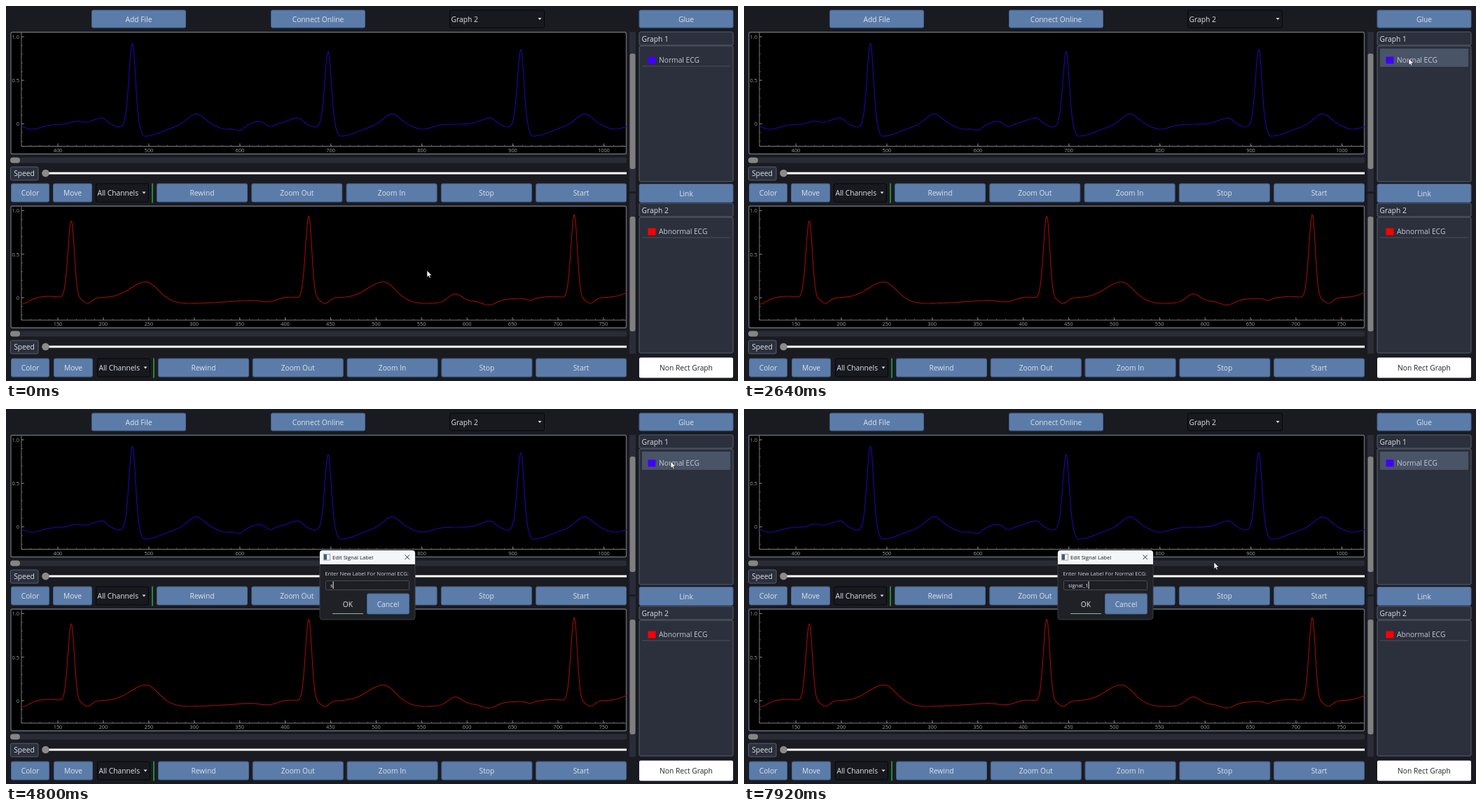
Animation, 1045 px wide and 536 px high, one loop 8000 ms. Source, as an HTML page:

```html
<!DOCTYPE html>
<html lang="en">
<head>
<meta charset="utf-8">
<title>Signal viewer</title>
<style>
html, body { margin: 0; width: 100%; height: 100%; overflow: hidden; background: #1a1b21; }
svg { display: block; width: 1045px; height: 536px; font-family: "Open Sans", "Noto Sans", sans-serif; fill: #dde2ea; }
text { white-space: pre; }
</style>
</head>
<body>
<svg id="stage" viewBox="0 0 1045 536"></svg>
<script>
const NS = 'http://www.w3.org/2000/svg';
const stage = document.getElementById('stage');
const SMALL = { 'font-size': 7.7 }, AXIS = { 'font-size': 7.4, fill: '#a0a0a0' };
let layer = stage;

function add(tag, attrs, content) {
  const el = document.createElementNS(NS, tag);
  for (const key in attrs) el.setAttribute(key, attrs[key]);
  if (content !== undefined) el.textContent = content;
  return layer.appendChild(el);
}
function group(draw) {
  const parent = layer;
  const g = layer = add('g', {});
  draw();
  layer = parent;
  return g;
}
const rect = (l, t, r, b, fill, more) =>
  add('rect', { x: l, y: t, width: r - l, height: b - t, fill, ...more });
const line = (x1, y1, x2, y2, stroke, width = 1) =>
  add('path', { d: `M${x1} ${y1}L${x2} ${y2}`, stroke, 'stroke-width': width, fill: 'none' });
function label(x, mid, str, more) {
  const style = { 'font-size': 10.25, ...more };
  return add('text', { x, y: mid + style['font-size'] * .355, ...style }, str);
}
const centred = (x, mid, str, more) => label(x, mid, str, { 'text-anchor': 'middle', ...more });

function button(l, t, r, b, str) {
  rect(l + .5, t + .5, r - .5, b - .5, '#5b7ca9', { rx: 2, stroke: '#45618a' });
  centred((l + r) / 2, (t + b) / 2 + .5, str);
}
function panel(l, t, r, b) {
  rect(l + .5, t + .5, r - .5, b - .5, '#2b303c', { rx: 2, stroke: '#565e6e' });
}
function combo(l, t, r, b, str) {
  rect(l + .5, t + .5, r - .5, b - .5, '#18191e', { rx: 2, stroke: '#060608' });
  label(l + 2.5, (t + b) / 2 + .7, str);
  const x = r - 7, y = (t + b) / 2 - 1.5;
  add('path', { d: `M${x - 2.5} ${y}h5l-2.5 3z`, fill: '#dde2ea' });
}

// Bell with its own width on each side of the centre.
function bell(dx, height, left, right = left) {
  const u = dx / (dx < 0 ? left : right);
  return height * Math.exp(-u * u / 2);
}
// Each beat is a spike plus the same small waves, placed relative to it.
function trace({ base, beats, waves, ripples, stroke }) {
  let d = '';
  for (let x = 22; x <= 886; x++) {
    let y = base;
    for (const [r, height] of beats) {
      y -= bell(x - r, height, 4.8, 4.2);
      for (const [offset, ...shape] of waves) y -= bell(x - r - offset, ...shape);
    }
    for (const [at, ...shape] of ripples) y -= bell(x - at, ...shape);
    d += (d ? 'L' : 'M') + x + ' ' + y.toFixed(2);
  }
  add('path', { d, stroke, fill: 'none', 'stroke-width': 1.1, 'stroke-linejoin': 'round' });
}

function plot(top, first, step, gap) {
  rect(7, top + .5, 885.5, top + 174.5, '#000', { rx: 2, stroke: '#686c75', 'stroke-width': 1.3 });
  const base = top + 163.5, axis = '#7d7d7d', minor = '#4a4a4a';
  for (let x = 22.5; x < 885; x += 13) line(x, base, x, base - 2, minor);
  for (let y = top + 7; y < base; y += 12.45) line(22, y, 24, y, minor);
  line(22, top + 1, 22, base, axis);
  line(22, base, 885, base, axis);
  for (let x = 74, n = first; x < 886; x += gap, n += step) {
    line(x, base, x, base - 4, axis);
    centred(x, top + 169.3, n, AXIS);
  }
  ['1.0', '0.5', '0'].forEach((s, i) => {
    const y = top + 7 + i * 62.2;
    line(22, y, 26, y, axis);
    label(19, y + .2, s, { ...AXIS, 'text-anchor': 'end' });
  });
}

function controls(top, speedTop, shift) {
  rect(7, speedTop - 13, 886, speedTop - 5, '#292b35', { rx: 2 });
  rect(6, speedTop - 13, 20, speedTop - 5, '#858585', { rx: 4 });
  panel(6, speedTop, 46.5, speedTop + 20);
  centred(26, speedTop + 10, 'Speed');
  line(56, speedTop + 9.5, 886, speedTop + 9.5, '#fff', 3);
  add('circle', { cx: 56.5, cy: speedTop + 9.5, r: 5.3, fill: '#8b8b8b' });

  const bottom = top + 27;
  button(7, top, 62, bottom, 'Color');
  button(67 + shift / 2, top, 123 + shift / 2, bottom, 'Move');
  combo(128 + shift, top, 204 + shift, bottom, 'All Channels');
  line(209 + shift, top, 209 + shift, bottom + 1, '#1f8a3a', 2);
  ['Rewind', 'Zoom Out', 'Zoom In', 'Stop', 'Start'].forEach((s, i) => {
    const l = 215 + shift + i * (135.3 - shift / 4);
    button(l, top, Math.min(l + 130, 886), bottom, s);
  });
}

function sidebar(top, title, name, color) {
  panel(903.5, top, 1038.5, top + 20);
  label(907.5, top + 10.5, title);
  panel(903.5, top + 20, 1038.5, top + 215);
  const mark = rect(908, top + 24.5, 1034, top + 50.5, '#4a5467', { visibility: 'hidden' });
  line(908, top + 49.5, 1034, top + 49.5, '#4b515d');
  rect(916.5, top + 36, 927.5, top + 46, color);
  label(932, top + 41, name, { fill: '#c3c8d1' });
  return mark;
}

rect(0, 0, 1045, 536, '#1a1b21');
button(122, 5.5, 257, 31.5, 'Add File');
button(378, 5.5, 513, 31.5, 'Connect Online');
combo(633, 5.5, 769, 31.5, 'Graph 2');
button(903.5, 5.5, 1038.5, 31.5, 'Glue');

plot(37, 400, 100, 129.9);
trace({
  base: 169,
  beats: [[-97, 110], [180.5, 116], [460, 104], [735, 107]],
  waves: [[-43, 9, 14, 6], [-19, -4, 6], [17, -17, 5, 26], [91, 15, 12, 11], [134, -7, 12, 14]],
  ripples: [[100, 4, 8], [334, -6, 6], [361, 4, 8], [377, -4, 5]],
  stroke: '#2305a4'
});

plot(285.5, 150, 50, 64.9);
trace({
  base: 417,
  beats: [[93.3, 110], [432.3, 117], [811.3, 119]],
  waves: [[-32, 2, 12], [23, -8, 6], [107, 23, 22, 16], [165, -8, 25, 70]],
  ripples: [[22, -9, 10], [375, -4, 12], [641, 12, 10], [690, -7, 10], [748, -3, 5]],
  stroke: '#a00a0a'
});

controls(253.5, 229.5, 0);
controls(503.5, 477.5, 2);

for (const [t, b, from, to] of [[37, 265, 68, 233], [268, 497, 301, 465]]) {
  rect(890, t, 899, b, '#2a2c37');
  rect(890.5, from, 898.5, to, '#7f7f80', { rx: 3 });
}

const mark = sidebar(36.5, 'Graph 1', 'Normal ECG', '#4000ff');
button(903.5, 254, 1038.5, 281, 'Link');
sidebar(281.5, 'Graph 2', 'Abnormal ECG', '#f00');
rect(904, 502.5, 1038, 531.5, '#fff', { rx: 2 });
centred(971, 517.5, 'Non Rect Graph', { fill: '#22252c' });

let selection, okLine, entry, caret;
const dialog = group(() => {
  rect(448, 202, 584, 301, '#1f2126', { rx: 4, stroke: '#393c43' });
  add('path', { d: 'M448 222v-16q0-4 4-4h128q4 0 4 4v16z', fill: '#f3f5f8' });
  rect(453.5, 207.5, 462.5, 216, '#fff', { stroke: '#858c96', 'stroke-width': .8 });
  rect(454, 208, 458, 215.5, '#3c5c7c');
  label(466, 212, 'Edit Signal Label', { ...SMALL, fill: '#15171a' });
  add('path', { d: 'M569.5 208.5l6.5 6.5m0-6.5l-6.5 6.5', stroke: '#333', fill: 'none' });
  label(455.3, 235.4, 'Enter New Label For Normal ECG:', { ...SMALL, fill: '#c9cdd4' });
  rect(456.5, 245.5, 575.5, 258.5, '#1d1e23', { rx: 1, stroke: '#484b52' });
  selection = rect(463, 246.5, 507.5, 257, '#2b7a5c');
  entry = label(463, 252, '', SMALL);
  caret = rect(0, 246.5, 1, 257, '#e4e7ec');
  centred(488, 279, 'OK');
  okLine = line(466, 292.5, 510, 292.5, '#c4c7cb', 1.2);
  button(515, 263.5, 576, 293.5, 'Cancel');
});

const pointer = add('path', {
  d: 'M0 0V9.6L2.2 7.6 3.8 11 5.3 10.3 3.8 7H6.8Z',
  fill: '#fff', stroke: '#111', 'stroke-width': .6
});

const LOOP = 8000, STEP = 80, MARK_AT = 2560, DIALOG_AT = 2800;
const TYPE_AT = 4720, KEY_TIME = 160, LAST_KEY_AT = 6480, NAME = 'signal_1';

// Eased progress from 0 to 1 between two times.
function ease(t, from, to) {
  const u = Math.max(0, Math.min(1, (t - from) / (to - from)));
  return u * u * (3 - 2 * u);
}
function pointerAt(t) {
  const up = ease(t, 80, 800), settle = ease(t, 800, 1200), leave = ease(t, 7440, 7920);
  return [601 + 318 * up + 30 * settle - 278 * leave, 378 - 322 * up + 19 * settle + 144 * leave];
}
function typedAt(t) {
  if (t >= LAST_KEY_AT) return NAME;
  const keys = Math.floor((t - TYPE_AT) / KEY_TIME) + 1;
  return NAME.slice(0, Math.max(0, Math.min(keys, NAME.length - 1)));
}
const show = (el, on) => el.setAttribute('visibility', on ? 'inherit' : 'hidden');

function render(now) {
  const t = Math.floor(now % LOOP / STEP) * STEP;
  const [x, y] = pointerAt(t);
  pointer.setAttribute('transform', `translate(${x.toFixed(2)} ${y.toFixed(2)})`);
  show(mark, t >= MARK_AT);
  show(dialog, t >= DIALOG_AT);
  const typed = typedAt(t);
  entry.textContent = typed || 'Normal ECG';
  show(selection, !typed);
  show(caret, typed);
  caret.setAttribute('x', 463 + entry.getComputedTextLength());
  okLine.setAttribute('stroke', typed ? '#8fb5a2' : '#c4c7cb');
}
function tick() {
  render(performance.now());
  requestAnimationFrame(tick);
}
tick();
</script>
</body>
</html>
```
